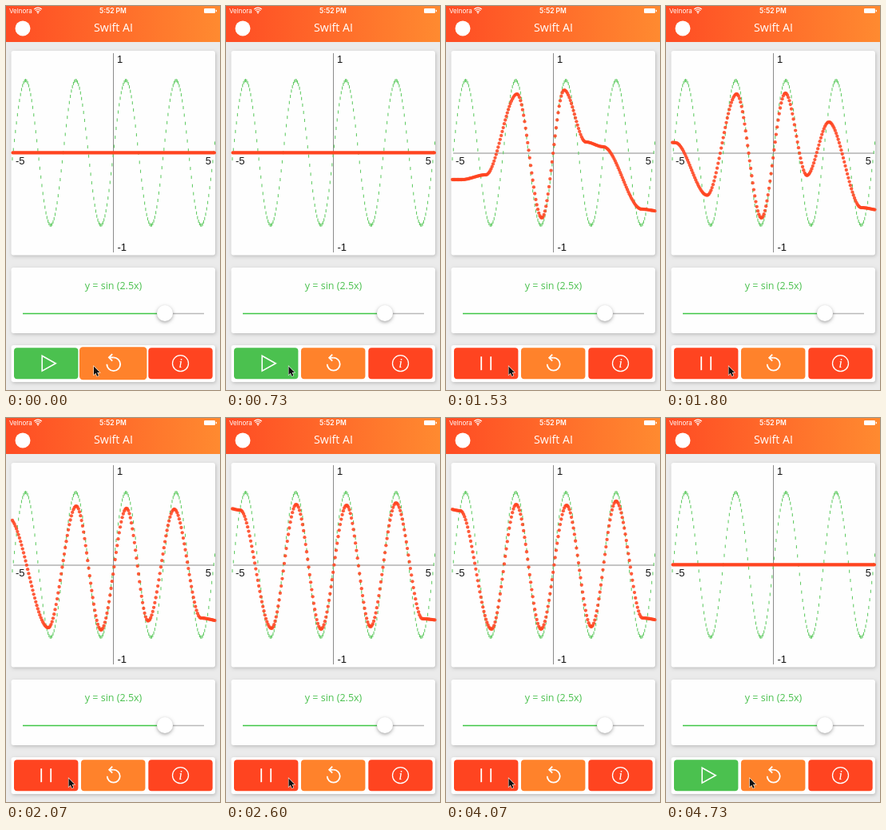
An HTML page with a canvas that plays this animation: 268 by 480 pixels, repeating every 4.79 s.

```html
<!DOCTYPE html>
<html lang="en">
<head>
<meta charset="utf-8">
<title>Swift AI</title>
<style>
  html, body { margin: 0; width: 100%; height: 100%; overflow: hidden; background: #ebebeb; }
  canvas { display: block; width: 268px; height: 480px; }
</style>
</head>
<body>
<canvas id="stage"></canvas>
<script>
const W = 268, H = 480, LOOP = 4790, STEP = 66.5;
const PLAY_AT = 860, RESET_AT = 4700;
const GREEN = '#4bc14f', ORANGE = '#ff822b', RED = '#ff4420';
const MID_X = 134.5, MID_Y = 183.5, UNIT = 25, AMP = 90.5;
const FIRST_X = 8, LAST_X = 261.5, SAMPLES = 200;

const canvas = document.getElementById('stage');
const ctx = canvas.getContext('2d');
const ratio = window.devicePixelRatio || 1;
canvas.width = W * ratio;
canvas.height = H * ratio;

// Turning points of the learned curve at successive moments of training.
const training = [
  { t: 860, x: [0, 20, 50, 89, 120, 150, 175, 200, 245, 270], y: Array(10).fill(MID_Y) },
  { t: 1130, x: [0, 20, 50, 89, 120, 150, 175, 200, 245, 270], y: [203, 202, 199, 170, 222, 148, 166, 172, 214, 218] },
  { t: 1530, x: [0, 20, 50, 89, 120, 148, 175, 197, 245, 270], y: [217, 217, 211, 110, 265, 105, 170, 176, 254, 257] },
  { t: 2070, x: [0, 3, 53, 88, 119, 151, 178, 211, 244, 270], y: [122, 123, 263, 110, 265, 113, 255, 113, 250, 254] },
  { t: 2600, x: [0, 18, 57, 88, 119, 151, 181, 213, 246, 270], y: [112, 115, 263, 108, 264, 109, 261, 106, 251, 253] },
  { t: 3400, x: [0, 18, 57, 88, 119, 151, 182, 213, 246, 270], y: [113, 116, 264, 108, 264, 109, 261, 104, 250, 253] }
];

const clamp01 = v => Math.max(0, Math.min(1, v));
const mix = (a, b, k) => a + (b - a) * k;
const smooth = k => k * k * (3 - 2 * k);
const ramp = (t, from, to) => clamp01((t - from) / (to - from));

function curveAt(t) {
  let i = 0;
  while (i < training.length - 2 && t > training[i + 1].t) i++;
  const a = training[i], b = training[i + 1], k = ramp(t, a.t, b.t);
  const blend = (p, q) => p.map((v, n) => mix(v, q[n], k));
  const xs = blend(a.x, b.x), ys = blend(a.y, b.y);
  return x => {
    let n = 0;
    while (n < xs.length - 2 && x > xs[n + 1]) n++;
    return mix(ys[n], ys[n + 1], smooth(ramp(x, xs[n], xs[n + 1])));
  };
}

function text(str, x, y, font, color, align = 'left') {
  ctx.font = font;
  ctx.fillStyle = color;
  ctx.textAlign = align;
  ctx.fillText(str, x, y);
}

function box(x, y, w, h, r, color) {
  ctx.fillStyle = color;
  ctx.beginPath();
  ctx.roundRect(x, y, w, h, r);
  ctx.fill();
}

function disc(x, y, r, color) {
  ctx.fillStyle = color;
  ctx.beginPath();
  ctx.arc(x, y, r, 0, Math.PI * 2);
  ctx.fill();
}

function line(points, color, width, close) {
  ctx.strokeStyle = color;
  ctx.lineWidth = width;
  ctx.beginPath();
  points.forEach(([x, y]) => ctx.lineTo(x, y));
  if (close) ctx.closePath();
  ctx.stroke();
}

function withShadow(blur, alpha, dx, dy, draw) {
  ctx.save();
  ctx.shadowColor = `rgba(0,0,0,${alpha})`;
  ctx.shadowBlur = blur * ratio;
  ctx.shadowOffsetX = dx * ratio;
  ctx.shadowOffsetY = dy * ratio;
  draw();
  ctx.restore();
}

const card = (y, h) => withShadow(4, 0.2, 1, 1.5, () => box(6.5, y, 255.5, h, 3, '#fefefe'));

function header() {
  const g = ctx.createLinearGradient(0, 0, W, 0);
  g.addColorStop(0, '#ff4c24');
  g.addColorStop(1, '#ff8a30');
  ctx.fillStyle = g;
  ctx.fillRect(0, 0, W, 45);

  text('Velnora', 4, 9, '8px Inter, sans-serif', '#fff');
  text('5:52 PM', 134, 9, '600 8.5px Inter, sans-serif', '#fff', 'center');
  ctx.strokeStyle = '#fff';
  ctx.lineWidth = 1.2;
  for (const r of [2.4, 4.6, 6.8]) {
    ctx.beginPath();
    ctx.arc(40, 9, r, -Math.PI * 0.75, -Math.PI * 0.25);
    ctx.stroke();
  }
  disc(40, 8.6, 0.9, '#fff');
  box(248, 3, 14, 6, 1.2, '#fff');
  box(262.8, 4.8, 1.2, 2.4, 0.5, '#fff');

  disc(21, 28, 9.5, '#fff');
  text('Swift AI', 134.5, 32, '14.2px "Open Sans", sans-serif', '#fff', 'center');
}

function graph(t) {
  card(56, 255.5);
  line([[MID_X, 59], [MID_X, 308]], '#8b8b8b', 1);
  line([[9, 184], [261, 184]], '#8b8b8b', 1);

  const eachSample = draw => {
    for (let i = 0; i < SAMPLES; i++) draw(mix(FIRST_X, LAST_X, i / (SAMPLES - 1)));
  };
  ctx.fillStyle = '#65cc67';
  eachSample(x => {
    const y = MID_Y - AMP * Math.sin(2.5 * (x - MID_X) / UNIT);
    ctx.fillRect(x - 0.55, y - 2, 1.1, 4);
  });

  const font = '13px "Liberation Sans", Arial, sans-serif';
  text('1', 139, 71, font, '#111');
  text('-1', 139.5, 306, font, '#111');
  text('-5', 12, 198, font, '#111');
  text('5', 257, 198, font, '#111', 'right');

  if (t < PLAY_AT || t >= RESET_AT) {
    box(6.5, 181.2, 256.5, 4.3, 2.1, RED);
  } else {
    const curve = curveAt(t);
    eachSample(x => disc(x, curve(x), 2.15, 'rgba(255,68,32,0.88)'));
  }
}

function slider() {
  card(327, 82);
  text('y = sin (2.5x)', 134.5, 354, '12.5px "Open Sans", sans-serif', GREEN, 'center');
  line([[199, 384.5], [248, 384.5]], '#b9b9b9', 1.6);
  line([[21, 384.5], [199, 384.5]], '#3fc546', 1.6);
  withShadow(4, 0.35, 0, 1.5, () => disc(199, 384, 10, '#fff'));
}

function playIcon() {
  line([[-5, -9.5], [12, 0], [-5, 9.5]], '#fff', 1.6, true);
}

function pauseIcon() {
  line([[-6, -8.5], [-6, 8.5]], '#fff', 1.8);
  line([[6, -8.5], [6, 8.5]], '#fff', 1.8);
}

function resetIcon() {
  ctx.strokeStyle = '#fff';
  ctx.lineWidth = 1.8;
  ctx.beginPath();
  ctx.arc(0.5, 1, 8, -Math.PI / 2, Math.PI);
  ctx.stroke();
  line([[0.5, -7], [-4, -7]], '#fff', 1.8);
  line([[-1, -11], [-5, -7], [-1, -3]], '#fff', 1.8);
}

function infoIcon() {
  ctx.strokeStyle = '#fff';
  ctx.lineWidth = 1.3;
  ctx.beginPath();
  ctx.arc(0, 0, 10, 0, Math.PI * 2);
  ctx.stroke();
  text('i', 0, 5.2, 'italic 17px "Liberation Serif", serif', '#fff', 'center');
}

function button(cx, color, icon, scale = 1) {
  ctx.save();
  ctx.translate(cx, 446.7);
  ctx.scale(scale, scale);
  box(-40.2, -19.5, 80.4, 39, 4, color);
  icon();
  ctx.restore();
}

// Short swell after a tap.
const pop = since => since < 0 || since > 230 ? 1 : 1 + 0.05 * Math.cos(since / 230 * Math.PI / 2);

function buttons(t) {
  const running = t >= PLAY_AT && t < RESET_AT;
  card(424, 46);
  button(218.5, RED, infoIcon);
  button(134.2, ORANGE, resetIcon, pop(t));
  button(50.2, running ? RED : GREEN, running ? pauseIcon : playIcon, pop(t - PLAY_AT));
}

function pointer(t) {
  const x = t < 2000
    ? mix(110, 78.5, smooth(ramp(t, 200, 680)))
    : mix(78.5, 110, ramp(t, 4370, LOOP));
  ctx.save();
  ctx.translate(x, 450.5);
  ctx.beginPath();
  [[0, 0], [0, 10.5], [2.4, 8.3], [4.1, 12.3], [5.9, 11.5], [4.2, 7.6], [7.4, 7.4]]
    .forEach(([px, py]) => ctx.lineTo(px, py));
  ctx.closePath();
  ctx.strokeStyle = 'rgba(255,255,255,0.85)';
  ctx.lineWidth = 1.2;
  ctx.stroke();
  ctx.fillStyle = '#111';
  ctx.fill();
  ctx.restore();
}

function render(now) {
  const t = Math.floor((now % LOOP + 5) / STEP) * STEP % LOOP;
  ctx.setTransform(ratio, 0, 0, ratio, 0, 0);
  ctx.fillStyle = '#ebebeb';
  ctx.fillRect(0, 0, W, H);
  header();
  graph(t);
  slider();
  buttons(t);
  pointer(t);
}

const start = performance.now();
function tick() {
  render(performance.now() - start);
  requestAnimationFrame(tick);
}
tick();
</script>
</body>
</html>
```
